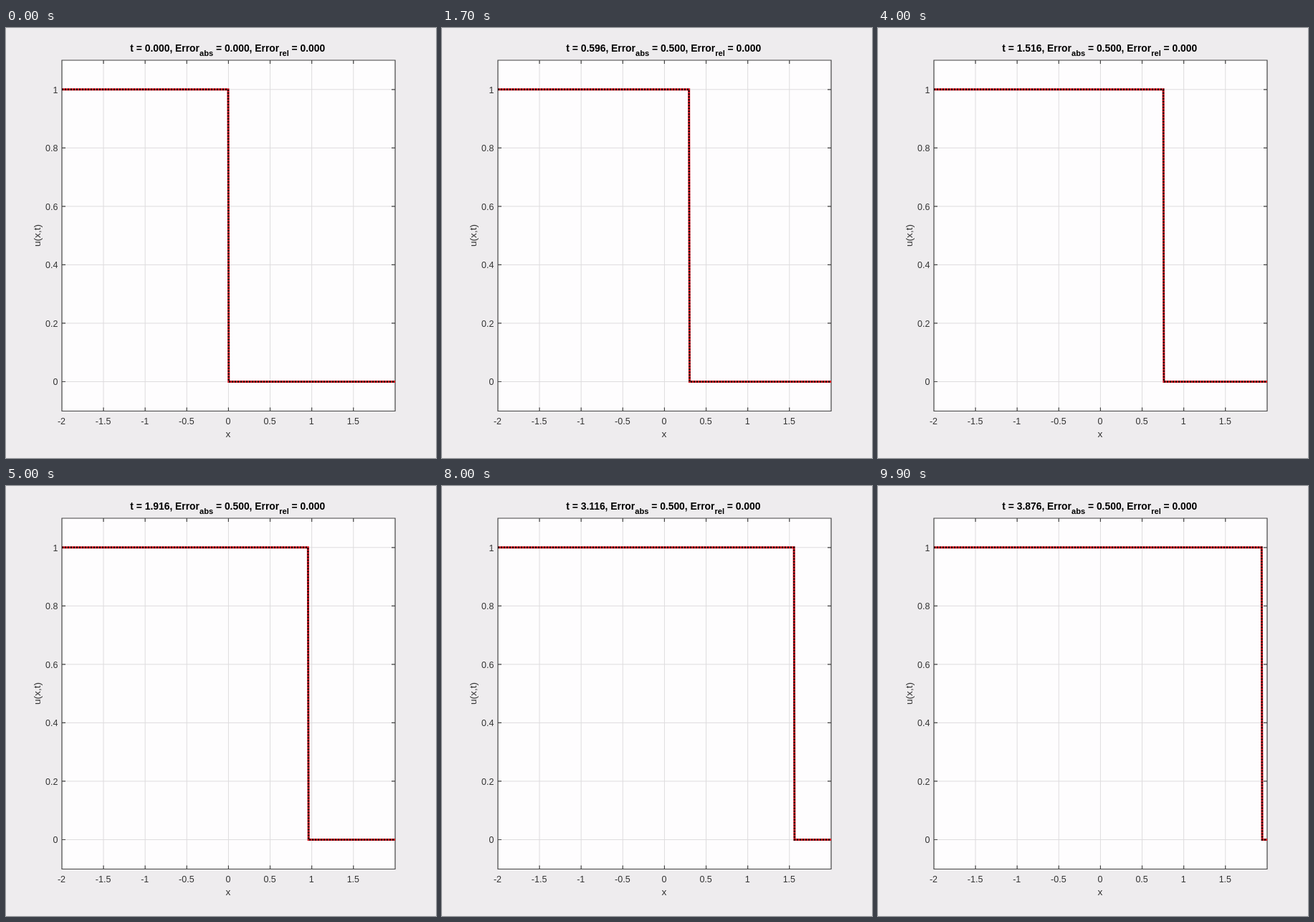
An HTML page for the animation above (10 s loop, 600 by 600 pixels).

```html
<!DOCTYPE html>
<html lang="en">
<head>
<meta charset="utf-8">
<title>Travelling step</title>
<style>
  html, body { margin: 0; height: 100%; overflow: hidden; background: #eeecee; }
  svg { display: block; width: 600px; height: 600px; }
  text { font: 12.5px "Liberation Sans", Arial, sans-serif; fill: #333; white-space: pre; }
  .mid { text-anchor: middle; }
  .end { text-anchor: end; }
  .label { font-size: 13.7px; }
  .title { font-size: 13.86px; font-weight: bold; fill: #000; }
  .sub { font-size: 11.1px; }
  path { fill: none; }
  #grid { stroke: #dedcde; }
  #axes { stroke: #444; stroke-width: 1.2; }
  #wave { stroke: #d8101c; stroke-width: 3; }
  #exact { stroke: #100406; stroke-width: 2.4; stroke-dasharray: 2 2; }
</style>
</head>
<body>
<svg viewBox="0 0 600 600">
  <clipPath id="plot"><rect x="77.5" y="45" width="466" height="490"/></clipPath>
  <rect x="78" y="45" width="465" height="489.5" fill="#fefdfe"/>
  <path id="grid"/>
  <path id="axes"/>
  <g clip-path="url(#plot)"><path id="wave"/><path id="exact"/></g>
  <g id="ticks"></g>
  <text class="mid label" x="310" y="571">x</text>
  <text class="mid label" transform="translate(47.5 289.5) rotate(-90)">u(x,t)</text>
  <text class="title" x="173.3" y="33"><tspan id="time"></tspan><tspan class="sub" dy="6">abs</tspan><tspan id="error" dy="-6"></tspan><tspan class="sub" dy="6">rel</tspan><tspan dy="-6"> = 0.000</tspan></text>
</svg>
<script>
  const $ = id => document.getElementById(id);
  const px = x => 310.4 + 116.25 * x;
  const py = u => 493.5 - 407.7 * u;
  const L = 78, R = 543, T = 45, B = 534.5, TICK = 5;

  let grid = "", axes = `M${L} ${T}H${R}V${B}H${L}Z`, labels = "";
  for (let x = -2; x < 2; x += 0.5) {
    const p = px(x);
    if (x > -2) {
      grid += `M${p} ${T}V${B}`;
      axes += `M${p} ${T}v${TICK}M${p} ${B}v${-TICK}`;
    }
    labels += `<text class="mid" x="${p - 0.4}" y="552.5">${x}</text>`;
  }
  for (let i = 0; i <= 5; i++) {
    const p = py(i / 5);
    grid += `M${L} ${p}H${R}`;
    axes += `M${L} ${p}h${TICK}M${R} ${p}h${-TICK}`;
    labels += `<text class="end" x="72.5" y="${p + 4.7}">${i / 5}</text>`;
  }
  $("grid").setAttribute("d", grid);
  $("axes").setAttribute("d", axes);
  $("ticks").innerHTML = labels;

  // The front moves at half speed after a short pause at the start.
  function draw(ms) {
    const step = Math.floor(ms % 10000 / 100);
    const t = Math.max(0, 0.04 * step - 0.084);
    const front = px(t / 2);
    const path = `M${L} ${py(1)}H${front - 0.4}L${front + 0.4} ${py(0)}H${R}`;
    $("wave").setAttribute("d", path);
    $("exact").setAttribute("d", path);
    $("time").textContent = `t = ${t.toFixed(3)}, Error`;
    $("error").textContent = ` = ${t > 0 ? "0.500" : "0.000"}, Error`;
  }

  const start = performance.now();
  function loop() {
    draw(performance.now() - start);
    requestAnimationFrame(loop);
  }
  loop();
</script>
</body>
</html>
```
